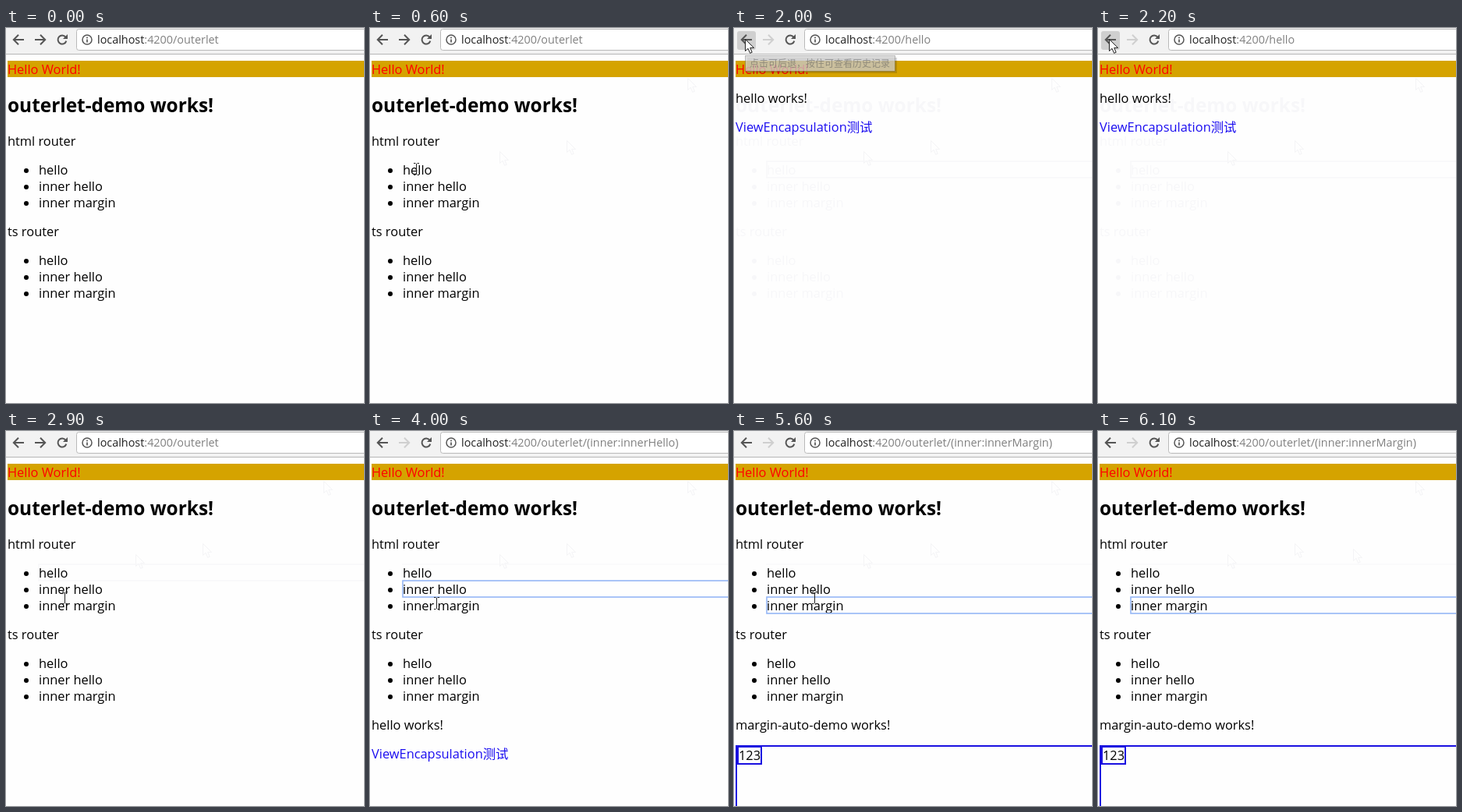
An HTML page with a canvas for the animation above (6700 ms loop, 459 px wide and 481 px high).

```html
<!DOCTYPE html>
<html lang="zh">
<head>
<meta charset="utf-8">
<title>Router outlet demo</title>
<style>
  html, body { margin: 0; height: 100%; overflow: hidden; background: #fefefe; }
  canvas { display: block; }
</style>
</head>
<body>
<canvas id="stage" width="459" height="481"></canvas>
<script>
const ctx = document.getElementById('stage').getContext('2d');
const LOOP = 6700;
const FAMILY = '"Open Sans", "Noto Sans CJK SC", sans-serif';
const BODY = '16.4px ' + FAMILY;
const HEADING = 'bold 24.4px ' + FAMILY;
const URL_FONT = '14.4px ' + FAMILY;
const GHOST = '#f7f7f9';

// Pointer track: time, x, y, shape (a = arrow, i = text beam, - = hidden)
const TRACK = [
  [0, 0, 0, '-'], [100, 407, 64, 'a'], [200, 252, 144, 'a'], [300, 166, 158, 'a'],
  [400, 100, 169, 'a'], [500, 70, 178, 'i'], [600, 59, 181, 'i'],
  [1000, 56, 172, 'a'], [1100, 49, 142, 'a'], [1200, 36, 95, 'a'], [1300, 22, 52, 'a'],
  [1400, 16, 30, 'a'], [1500, 15, 24, 'a'], [1600, 15, 19, 'a'], [1700, 14, 16, 'a'], [1800, 14, 14, 'a'],
  [2400, 25, 60, 'a'], [2500, 48, 135, 'a'], [2600, 63, 181, 'i'], [2700, 68, 195, 'i'],
  [2800, 73, 208, 'i'], [2900, 75, 214, 'i'], [3000, 78, 211, 'i'], [3100, 80, 207, 'i'],
  [3200, 81, 204, 'i'], [3900, 83, 213, 'i'], [4000, 85, 221, 'i'],
  [5600, 103, 214, 'i'], [5700, 160, 204, 'a'], [5800, 240, 182, 'a'],
  [5900, 327, 151, 'a'], [6000, 426, 118, 'a'], [6100, 0, 0, '-'],
];
// Faint marks the pointer leaves behind
const TRAILS = [[200, 407, 64], [300, 252, 144], [400, 166, 158], [6000, 327, 151]];

function text(s, x, y, color = '#000', font = BODY) {
  ctx.font = font;
  ctx.fillStyle = color;
  ctx.fillText(s, x, y);
  return x + ctx.measureText(s).width;
}

function rect(x, y, w, h, color) {
  ctx.fillStyle = color;
  ctx.fillRect(x, y, w, h);
}

function path(d, stroke, fill, width = 1) {
  const p = new Path2D(d);
  if (fill) { ctx.fillStyle = fill; ctx.fill(p); }
  if (stroke) { ctx.strokeStyle = stroke; ctx.lineWidth = width; ctx.stroke(p); }
}

function at(x, y, draw) {
  ctx.save();
  ctx.translate(x, y);
  draw();
  ctx.restore();
}

function arrow(x, y, stroke, fill) {
  at(x, y, () => path('M.5 .5V15.5L4 12.3L6.6 18.3L9.2 17.2L6.7 11.4H11.5Z', stroke, fill));
}

function beam(x, y) {
  at(x, y, () => path('M-3 -7.5H-.5M1.5 -7.5H4M.5 -7V7M-3 7.5H-.5M1.5 7.5H4', '#222'));
}

function toolbar(route, canForward, hover) {
  rect(0, 0, 459, 33, '#f2f2f2');
  rect(0, 33, 459, 1, '#b6b6b6');
  if (hover) {
    ctx.fillStyle = '#cfcfcf';
    ctx.beginPath();
    ctx.roundRect(4, 4, 24, 24, 3);
    ctx.fill();
  }
  const back = 'M7 0H-6M0 -6.2L-6.2 0L0 6.2';
  at(16, 15, () => path(back, '#555', null, 2));
  at(44, 15, () => { ctx.scale(-1, 1); path(back, canForward ? '#555' : '#cfcfcf', null, 2); });
  at(72, 15, () => {
    path('M4.4 -3.4A5.5 5.5 0 1 0 5.3 1.6', '#555', null, 2);
    path('M7 -7V-1H1Z', null, '#555');
  });
  ctx.beginPath();
  ctx.roundRect(90.5, 1.5, 400, 27, 3);
  ctx.fillStyle = '#fff';
  ctx.fill();
  ctx.strokeStyle = '#b9b9b9';
  ctx.lineWidth = 1;
  ctx.stroke();
  at(104, 15, () => {
    path('M6 0A6 6 0 1 1 -6 0A6 6 0 1 1 6 0Z', '#555', null, 1.5);
    path('M0 -3.5V-1.7M0 -.6V3.5', '#555', null, 1.7);
  });
  const x = text('localhost', 117, 20, '#222', URL_FONT);
  text(':4200/' + route, x, 20, '#808080', URL_FONT);
}

function menu(title, y, color) {
  text(title, 2, y, color);
  ['hello', 'inner hello', 'inner margin'].forEach((label, i) => {
    const base = y + 37 + 21 * i;
    ctx.beginPath();
    ctx.arc(26, base - 5, 3, 0, 7);
    ctx.fill();
    text(label, 42, base, color);
  });
}

function outletPage(color) {
  text('outerlet-demo works!', 2, 108, color, HEADING);
  menu('html router', 151, color);
  menu('ts router', 267, color);
}

function helloView(y) {
  text('hello works!', 2, y);
  text('ViewEncapsulation测试', 2, y + 37, '#1a0cf0');
}

function marginView() {
  text('margin-auto-demo works!', 2, 383);
  ctx.strokeStyle = '#1a10e0';
  ctx.lineWidth = 2;
  ctx.strokeRect(3, 404, 500, 200);
  ctx.strokeRect(5, 405, 30, 22);
  text('123', 6, 422);
}

function focusRing(row, color, width) {
  ctx.strokeStyle = color;
  ctx.lineWidth = width;
  ctx.strokeRect(42, 171 + 21 * row, 500, 21);
}

function tooltip(alpha) {
  ctx.save();
  ctx.globalAlpha = alpha;
  rect(17, 38, 192, 20, 'rgba(0,0,0,.3)');
  rect(14, 35, 193, 21, '#767676');
  rect(15, 36, 191, 19, '#fff');
  text('点击可后退，按住可查看历史记录', 20, 50, '#575757', '12px "Noto Sans CJK SC", sans-serif');
  ctx.restore();
}

function render(t) {
  const within = (a, b) => t >= a && t < b;
  const onHello = within(900, 2300);
  const inner = t >= 4900 ? 'innerMargin' : t >= 3600 ? 'innerHello' : '';

  rect(0, 0, 459, 481, '#fefefe');
  toolbar(onHello ? 'hello' : 'outerlet' + (inner && `/(inner:${inner})`),
    !onHello && !inner, within(1600, 2400));
  rect(2, 42, 457, 21, '#d5a300');
  text('Hello World!', 2, 59, '#f00');

  for (const [start, x, y] of TRAILS) if (t >= start) arrow(x, y, '#f4f4f6');
  if (within(900, 3400)) focusRing(0, GHOST, 1.5);
  if (t >= 3400) rect(41, 170.5, 418, 1, GHOST);

  if (onHello) {
    outletPage(GHOST);
    helloView(96);
  } else {
    outletPage('#000');
    if (inner === 'innerHello') helloView(383);
    if (inner === 'innerMargin') marginView();
    const row = t >= 4700 ? 2 : t >= 3400 ? 1 : within(800, 900) ? 0 : -1;
    if (row >= 0) focusRing(row, '#94b6f6', 1.6);
  }

  if (within(2000, 2200)) tooltip(t < 2100 ? 0.5 : 1);

  const [, x, y, shape] = TRACK.findLast(step => step[0] <= t);
  if (shape === 'a') arrow(x, y, '#222', '#fff');
  if (shape === 'i') beam(x, y);
}

const start = performance.now();
function tick() {
  render((performance.now() - start) % LOOP);
  requestAnimationFrame(tick);
}
tick();
</script>
</body>
</html>
```
